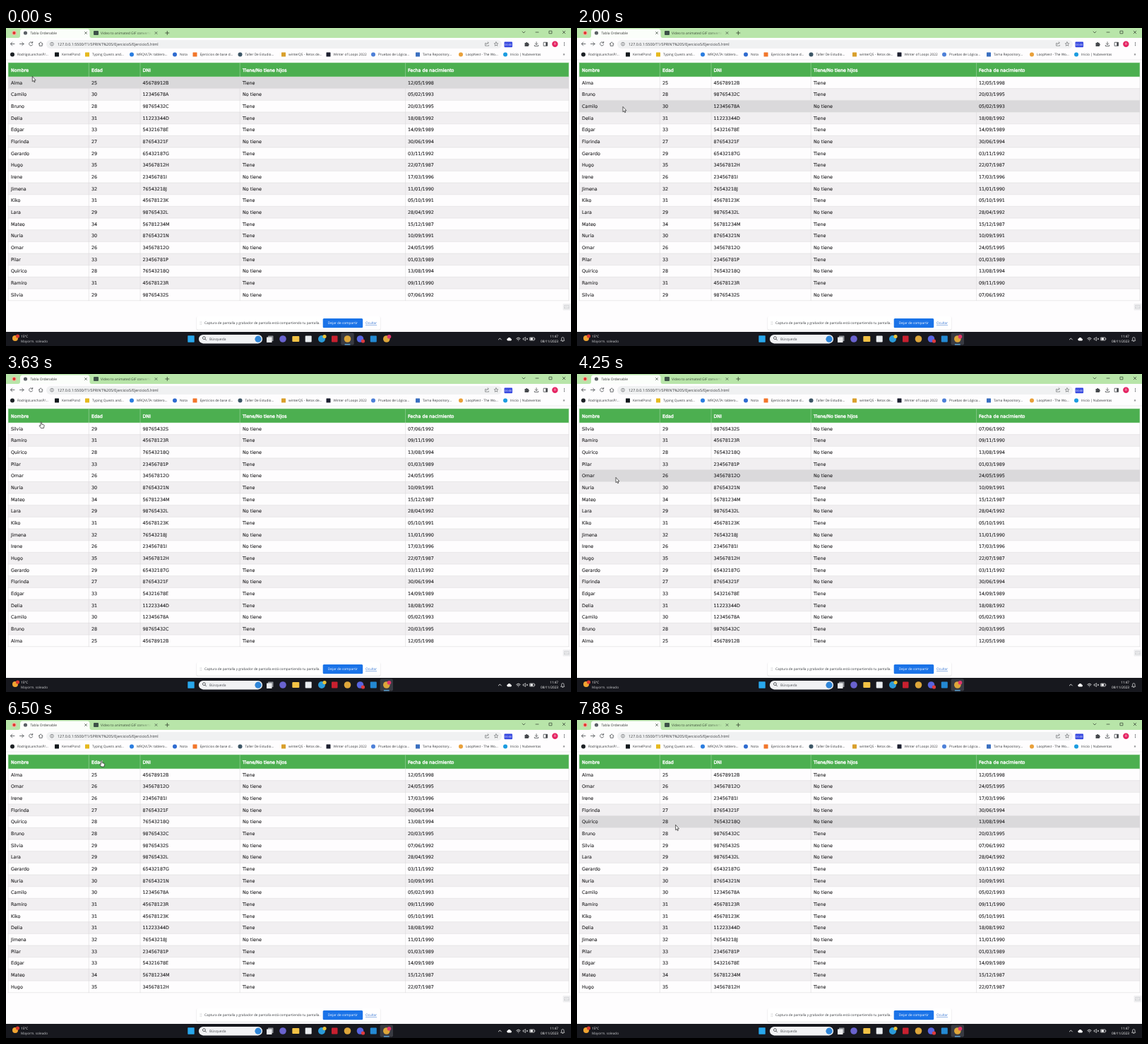
Write an HTML page that moves like this. It is 800 px wide and 450 px high and loops after 8000 ms.

```html
<!DOCTYPE html>
<html lang="es">
<head>
<meta charset="utf-8">
<title>Tabla Ordenable</title>
<style>
html, body { margin: 0; width: 100%; height: 100%; overflow: hidden; background: #fff; }
svg { display: block; width: 100vw; height: 100vh; }
text { font: 5px "Open Sans", "Noto Sans", sans-serif; text-rendering: geometricPrecision; white-space: pre; }
text.cell { font: 6.4px "DejaVu Sans", sans-serif; fill: #1c1b1d; stroke: #1c1b1d; stroke-width: .08; }
text.head { font: 6.3px "DejaVu Sans", sans-serif; fill: #fff; stroke: #fff; stroke-width: .4; stroke-linejoin: round; }
</style>
</head>
<body>
<svg id="stage" viewBox="0 0 800 450" preserveAspectRatio="none">
  <defs>
    <linearGradient id="fade" gradientUnits="userSpaceOnUse" x1="190" x2="206" y1="0" y2="0">
      <stop stop-color="#3a4a38"/><stop offset="1" stop-color="#3a4a38" stop-opacity="0"/>
    </linearGradient>
  </defs>
</svg>
<script>
const NS = 'http://www.w3.org/2000/svg';
const stage = document.getElementById('stage');

function add(tag, attrs, parent = stage) {
  const node = document.createElementNS(NS, tag);
  for (const key in attrs) node.setAttribute(key, attrs[key]);
  return parent.appendChild(node);
}
const rect = (x, y, width, height, fill, rx = 0, more = {}) =>
  add('rect', { x, y, width, height, fill, rx, ...more });
const dot = (cx, cy, r, fill) => add('circle', { cx, cy, r, fill });
const line = (d, stroke = '#4a4d50', width = .8, more = {}) =>
  add('path', { d, stroke, 'stroke-width': width, fill: 'none', 'stroke-linecap': 'round', 'stroke-linejoin': 'round', ...more });
function label(str, x, y, fill = '#333', size = 5, more = {}) {
  const node = add('text', { x, y, fill, style: `font-size:${size}px`, ...more });
  node.textContent = str;
  return node;
}

const people = `Alma 25 45678912B 1 12/05/1998
Camilo 30 12345678A 0 05/02/1993
Bruno 28 98765432C 1 20/03/1995
Delia 31 11223344D 1 18/08/1992
Edgar 33 54321678E 1 14/09/1989
Florinda 27 87654321F 0 30/06/1994
Gerardo 29 65432187G 1 03/11/1992
Hugo 35 34567812H 1 22/07/1987
Irene 26 23456781I 0 17/03/1996
Jimena 32 76543218J 0 11/01/1990
Kiko 31 45678123K 1 05/10/1991
Lara 29 98765432L 0 28/04/1992
Mateo 34 56781234M 1 15/12/1987
Nuria 30 87654321N 1 10/09/1991
Omar 26 34567812O 0 24/05/1995
Pilar 33 23456781P 1 01/03/1989
Quirico 28 76543218Q 0 13/08/1994
Ramiro 31 45678123R 1 09/11/1990
Silvia 29 98765432S 0 07/06/1992`.split('\n').map(row => {
  const cells = row.split(' ');
  cells[3] = cells[3] === '1' ? 'Tiene' : 'No tiene';
  return cells;
});

const byName = [...people].sort((a, b) => a[0] < b[0] ? -1 : 1);
const byNameDown = [...byName].reverse();
const byAge = [...byNameDown].sort((a, b) => a[1] - b[1]);

const TOP = 69, ROW = 16.67, COUNT = people.length, BOTTOM = TOP + ROW * COUNT;
const columns = [7, 121, 193.5, 335, 569];
const borders = [3.3, 117.3, 190, 331.2, 565.6, 796.8];

function drawBrowser() {
  rect(0, 0, 800, 450, '#fefdfe');
  rect(0, 0, 800, 14, '#b8e5a9');
  dot(11.5, 7, 3.2, '#f0b3a0');
  dot(11.5, 7, 2, '#e0322b');
  add('path', { d: 'M17 14Q20 14 20 11V5Q20 1.5 23.500 1.5H115Q118.500 1.5 118.500 5V11Q118.500 14 121.500 14Z', fill: '#fbfefa' });
  dot(27.5, 7, 2.6, '#5b6066');
  label('Tabla Ordenable', 34.5, 8.8, '#333', 4.9);
  rect(124, 4, 7, 6, '#3d5148', 1);
  label('Video to animated GIF converte', 134, 8.8, 'url(#fade)', 4.9);
  for (const x of [113, 212.5]) line(`M${x - 1.5} 5.500l3 3m0 -3l-3 3`, '#3c4a3c', .7);
  line('M228.300 4.500v5m-2.500 -2.500h5', '#33402f', .8);
  line('M731 5l2 2l2 -2M750 6h4M769.300 4.200h3.600v3.600h-3.600zM788.200 4.200l3.600 3.600m0 -3.600l-3.600 3.600', '#2f3a2e', .7);

  rect(0, 14, 800, 31, '#fefdfe');
  line('M12 22.500H6.500m2.300 -2.400l-2.300 2.400l2.300 2.400M19.500 22.500H25m-2.300 -2.400l2.300 2.400l-2.300 2.400');
  line('M37.400 20.900a2.600 2.600 0 1 0 .3 2.600M37.700 19.400v1.800h-1.800');
  line('M46.300 22.600l2.900 -2.700l2.900 2.700M47.200 22v3.300h4V22');
  rect(57, 17, 645, 12, '#f0f1f2', 6);
  add('circle', { cx: 65, cy: 22.7, r: 2.4, fill: 'none', stroke: '#55585b', 'stroke-width': .6 });
  line('M65 22.600v1.200M65 21.500v.1', '#55585b', .6);
  label('127.0.0.1:5500/T1/SPRINT%205/Ejercicio5/Ejercicio5.html', 73, 24.8, '#36383b', 5.4);
  line('M680 21.500h-1.500v3.700h5v-1M680 23.500q.5 -2.600 3 -2.600m-1 -1.200l1.300 1.200l-1.300 1.200', '#606366', .6);
  line('M694 19.800l.8 1.900l2.100 .2l-1.600 1.400l.5 2l-1.800 -1.100l-1.800 1.100l.5 -2l-1.600 -1.400l2.100 -.2z', '#606366', .6);
  rect(705.5, 19.5, 11.5, 7.8, '#3648e0', 1);
  label('00:00', 706.2, 25, '#fff', 3.9, { 'font-weight': 700 });
  add('path', { d: 'M734.500 21h1.600a1.100 1.100 0 1 1 2.200 0h1.500v1.500a1.100 1.100 0 1 1 0 2.200v1.300h-5.300z', fill: '#45484c' });
  line('M751 19.800v3.700m-1.700 -1.600l1.700 1.700l1.700 -1.700M748.300 24.300v1.300h5.400v-1.300');
  line('M761.500 20.300h5v5h-5z', '#45484c', .8);
  rect(764.2, 20.3, 2.3, 5, '#45484c');
  dot(777.3, 22.7, 4.2, '#e52462');
  label('R', 775.9, 24.4, '#fff', 4.6);
  for (const y of [20.7, 22.7, 24.7]) dot(790.5, y, .6, '#45484c');

  const marks = [
    [9, 'RodrigoLanchasP/...', '#1e2226'], [72, 'KernelPond', '#12191d', 1],
    [115, 'Typing Quests and...', '#e5b91f', 1], [178, 'MRQVLTA: tablero...', '#2b7de0'],
    [239, 'Nota', '#2f6bd0'], [267.5, 'Ejercicios de base d...', '#f2762a', 1],
    [331.5, 'Taller De Estudio...', '#3d5666'], [393, 'winterQS - Retos de...', '#d9a02c', 1],
    [456.5, 'Winter of Loops 2022', '#1d2030', 1], [520, 'Pruebas de Lógica...', '#4e80d8'],
    [583, 'Tarna Repository...', '#3a6fc0', 1], [644, 'LoopNest - The Wo...', '#e9a03a'],
    [707, 'Inicio | Nubeventas', '#1b9ce0']
  ];
  for (const [x, name, color, square] of marks) {
    if (square) rect(x - 3, 34.5, 6, 6, color, .5);
    else dot(x, 37.5, 3, color);
    label(name, x + 7, 39.3, '#36383b', 4.75);
  }
  label('»', 788.5, 39.2, '#36383b', 6);
  line('M0 45H800', '#e2e1e3', .6);
}

function drawShareBar() {
  rect(788.5, 390, 11, 9.5, '#efeff1', 1);
  line('M791 392.500h6v4.500h-6zM791 396l2 -2l1.500 1.500l1 -1l1.500 1.500', '#c5c6ca', .6);
  rect(269.5, 408.5, 261, 19.5, '#e4e4e6', 2);
  rect(270, 408, 260, 19, '#fff', 2);
  for (let i = 0; i < 6; i++) dot(275 + i % 2 * 1.7, 415.8 + (i >> 1) * 1.8, .4, '#8b8e92');
  label('Captura de pantalla y grabador de pantalla está compartiendo tu pantalla.', 281, 419.4, '#3b3e42', 4.75, { textLength: undefined });
  rect(448.7, 411, 56.5, 13.2, '#1a73e8', 1.5);
  label('Dejar de compartir', 476.9, 419.4, '#fff', 4.8, { 'text-anchor': 'middle', 'font-weight': 700 });
  label('Ocultar', 509, 419.3, '#2d6fd0', 4.7, { 'text-decoration': 'underline' });
}

function drawTaskbar() {
  rect(0, 430, 800, 20, '#17181e');
  dot(13, 439, 4, '#f0a431');
  dot(16.5, 436, 2.6, '#d8392f');
  label('15°C', 21, 438.4, '#fff', 4.7);
  label('Mayorm. soleado', 21, 445.2, '#c8c9cc', 4.7);
  rect(257.3, 435.3, 9.4, 9.4, '#29a7ec', .6);
  rect(273, 434, 90, 12.4, '#f1f2f4', 6.2);
  line('M283.500 441.800l-1.700 -1.700a2 2 0 1 1 .1 -.1', '#34363a', .8);
  label('Búsqueda', 288, 442, '#505358', 5);
  dot(357, 440.2, 4.6, '#2f86d8');
}

function drawIcons() {
  rect(371, 435.5, 7.5, 7.5, '#8b8e94', .5);
  rect(369, 437.5, 7.5, 7.5, '#e9eaec', .5);
  dot(392, 440, 4.8, '#6a63cf');
  rect(405.3, 436, 10, 8, '#f2c245', 1);
  rect(423.7, 435.5, 9, 9, '#e9edf0', 1);
  dot(447, 440, 5, '#2b9bd9');
  dot(451, 436.5, 2.6, '#e8c23a');
  rect(461, 435.5, 8.5, 9, '#c8202f', 1);
  dot(483.5, 440, 4.8, '#dda63a');
  dot(501.5, 440, 4.8, '#5865e0');
  dot(505.5, 443, 2.6, '#dd3b3f');
  rect(515.8, 435.5, 9, 9, '#2489d2', 1);
  dot(538.8, 440, 4.8, '#dda63a');
  dot(542.5, 436.8, 2.8, '#e0356d');

  line('M697.300 441l2 -2l2 2', '#fff', .8);
  add('path', { d: 'M710.500 442.500a1.700 1.700 0 0 1 0 -3.300a2.400 2.400 0 0 1 4.300 .4a1.500 1.500 0 0 1 0 2.900z', fill: '#fff' });
  line('M722.800 439.300q2.700 -2.600 5.400 0M723.900 440.700q1.600 -1.400 3.200 0M725.500 442.200v.1', '#fff', .8);
  line('M732.500 439h1.200l1.700 -1.500v5l-1.700 -1.500h-1.200zM737 439l1.800 2m0 -2l-1.800 2', '#fff', .6);
  line('M742 438h6v4h-6zM748.800 439.300v1.400', '#fff', .6);
  rect(742.5, 438.4, 3.4, 3.2, '#fff');
  label('11:47', 782, 438.4, '#fff', 4.7, { 'text-anchor': 'end' });
  label('08/11/2023', 782, 445.2, '#fff', 4.7, { 'text-anchor': 'end' });
  line('M785.800 442.300h5l-.8 -1.300v-1.700a1.700 1.700 0 0 0 -3.400 0v1.700zM787.700 443.400h1.200', '#fff', .6);
}

drawBrowser();

rect(3, 49, 794, 20, '#4caf50');
const bands = people.map((_, i) => rect(3, TOP + ROW * i, 794, ROW, '#fff'));
let grid = '';
for (let i = 1; i <= COUNT; i++) grid += `M3 ${TOP + ROW * i}H797`;
for (const x of borders) grid += `M${x} ${TOP}V${BOTTOM}`;
line(grid, '#dad9db', .55);
line(borders.map(x => `M${x} 49V69`).join('') + 'M3 49.200H797M3 69H797', '#b4dcb5', .5);
['Nombre', 'Edad', 'DNI', 'Tiene/No tiene hijos', 'Fecha de nacimiento'].forEach((title, i) => {
  add('text', { x: columns[i], y: 61.6, class: 'head' }).textContent = title;
});
const cells = people.map((_, i) => columns.map(x =>
  add('text', { x, y: 79.7 + ROW * i, class: 'cell' })));

drawShareBar();
drawTaskbar();
const focus = rect(474.3, 431.5, 18.4, 17, '#383a42', 2);
const underline = rect(479.5, 447.3, 8, 1.1, '#62b5ee', .5);
drawIcons();

const ink = { fill: '#fff', stroke: '#222', 'stroke-width': .7, 'stroke-linejoin': 'round' };
const arrow = add('path', { d: 'M0 -.7V6.700L1.600 5.300L2.700 7.700L3.800 7.200L2.700 4.900H4.900Z', ...ink });
const hand = add('path', { d: 'M-.8 .6Q0 -.5 .8 .6V3.200L3.800 3.900Q4.500 4.200 4.300 5.200L3.600 8.600H-.3L-2.500 5.500Q-2.600 4.500 -1.700 4.700L-.8 5.400Z', ...ink });

// Pointer stops: time, x, y
const path = [
  [0, 37.3, 69.1], [250, 40, 65], [375, 42, 63], [750, 42, 63], [1125, 56, 108],
  [1500, 66, 143], [1625, 66, 141], [2000, 65, 112], [2375, 51, 63], [3250, 51, 63],
  [3625, 49.8, 68], [4000, 53, 129], [4250, 55, 147], [4625, 60, 146], [5000, 67, 104],
  [5250, 69.8, 65], [5750, 129, 57.5], [5875, 135.3, 57.5], [6625, 135.3, 57.5],
  [7125, 138, 116], [7500, 140, 157], [7875, 139.6, 149], [8000, 139.6, 149]
];

function pointer(t) {
  let i = 0;
  while (i < path.length - 2 && t >= path[i + 1][0]) i++;
  const [t0, x0, y0] = path[i], [t1, x1, y1] = path[i + 1];
  const k = (t - t0) / (t1 - t0);
  return [x0 + (x1 - x0) * k, y0 + (y1 - y0) * k];
}

const orderAt = t => t < 375 ? people : t < 2500 ? byName : t < 6500 ? byNameDown : byAge;

let shown;
function render(time) {
  const t = Math.floor(time % 8000 / 125) * 125;
  const order = orderAt(t);
  if (order !== shown) {
    order.forEach((row, i) => row.forEach((str, j) => { cells[i][j].textContent = str; }));
    shown = order;
  }
  const [x, y] = pointer(t);
  const hover = Math.floor((y - TOP) / ROW);
  bands.forEach((band, i) =>
    band.setAttribute('fill', i === hover ? '#dad9db' : i % 2 ? '#f1eff1' : '#fefdfe'));
  const over = y >= TOP;
  arrow.setAttribute('visibility', over ? 'visible' : 'hidden');
  hand.setAttribute('visibility', over ? 'hidden' : 'visible');
  (over ? arrow : hand).setAttribute('transform', `translate(${x} ${y})`);
  const shift = `translate(${t < 375 ? 0 : 55.3} 0)`;
  focus.setAttribute('transform', shift);
  underline.setAttribute('transform', shift);
}

const start = performance.now();
function tick() {
  render(performance.now() - start);
  requestAnimationFrame(tick);
}
tick();
</script>
</body>
</html>
```
